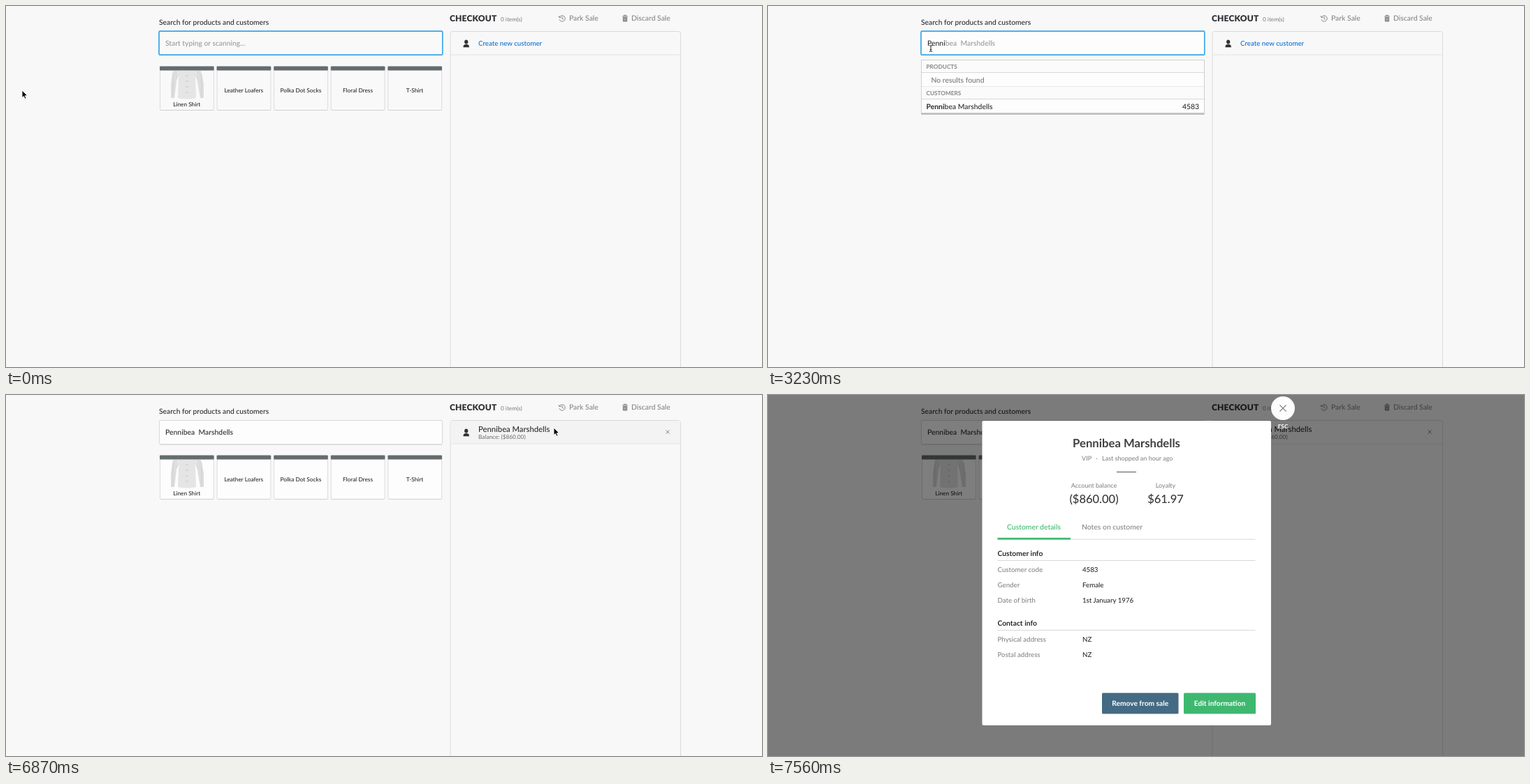
An HTML page for the animation above (9170 ms loop, 1082 px wide and 518 px high).

```html
<!DOCTYPE html>
<html lang="en">
<head>
<meta charset="utf-8">
<title>Checkout</title>
<style>
html, body { margin: 0; width: 100%; height: 100%; overflow: hidden; background: #f8f8f8; }
svg { display: block; font-family: Lato, "Open Sans", sans-serif; font-weight: 500; text-rendering: geometricPrecision; }
.b { font-weight: 700; }
</style>
</head>
<body>
<svg id="stage" width="1082" height="518" viewBox="0 0 1082 518"></svg>
<script>
const LOOP = 9170, INK = '#2b2b30', GREY = '#868686', GREEN = '#3eb870';
const NAME = 'Pennibea Marshdells';
const products = [['Blue Pen', '$3.00'], ['Polka Dot Socks', '$12.00']];
const customers = [['Petra Wadkins', 'Petra-K4D7'], [NAME, '4583']];
const cards = ['Linen Shirt', 'Leather Loafers', 'Polka Dot Socks', 'Floral Dress', 'T-Shirt'];

// [time, value]: each value holds until the next
const typing = [[0, ''], [1630, 'P'], [1960, 'Pe'], [2110, 'Pen'], [2380, 'Penn'], [2570, 'Penni'], [3580, NAME]];
const queries = [[0, ''], [1720, 'P'], [2110, 'Pe'], [2200, 'Pen'], [2480, 'Penn'], [2750, 'Penni'], [4360, '']];
const caretOn = [[0, false], [1330, true], [3230, false], [3580, true], [4060, false]];
const dimming = [[0, 0], [6960, .25], [7050, .5]];

// [time, x, y] of the pointer
const path = [
  [0, 23, 121], [60, 38, 119], [240, 38, 119], [420, 134, 98], [480, 167, 91], [600, 222, 58], [660, 233, 61],
  [4960, 233, 61], [5020, 234, 61], [5400, 440, 52], [5700, 600, 42], [5800, 640, 29], [5910, 671, 28],
  [6120, 727, 30], [6300, 780, 50], [6400, 784, 47], [7200, 784, 47], [7260, 728, 122], [7440, 728, 122], [7500, 522, 461]
];

const ctx = document.createElement('canvas').getContext('2d');
const inputText = s => s.replace(' ', '\u00a0\u00a0');
const widthOf = s => {
  ctx.font = '500 10.4px Lato, "Open Sans", sans-serif';
  ctx.textRendering = 'geometricPrecision';
  return ctx.measureText(inputText(s)).width;
};
const at = (keys, t) => keys.filter(k => k[0] <= t).pop()[1];

const text = (x, y, size, fill, s, more = '') =>
  `<text x="${x}" y="${y}" font-size="${size}" fill="${fill}" ${more}>${s}</text>`;
const rect = (x, y, w, h, fill, more = '') =>
  `<rect x="${x}" y="${y}" width="${w}" height="${h}" fill="${fill}" ${more}/>`;
const line = (d, stroke, w = 1, more = '') =>
  `<path d="${d}" fill="none" stroke="${stroke}" stroke-width="${w}" ${more}/>`;
const cross = (x, y, r, stroke, w) =>
  line(`M${x - r} ${y - r}l${2 * r} ${2 * r}m0 ${-2 * r}l${-2 * r} ${2 * r}`, stroke, w);
const BOLD = 'class="b"', MID = 'text-anchor="middle"', END = 'text-anchor="end"';

const shirt =
  `<path d="M239 93L236 112V132h5l3-24 2-15zM279 93l4 19v20h-5l-4-24-2-15z" fill="#dedede"/>
   <path d="M246 93h26l-1 8 1 31c-8 2-18 2-26 0l1-31z" fill="#e5e5e5"/>` +
  line('M239 97v34M280 97v34M247 97l-3 8M271 97l3 8', '#cfcfcf', 1) +
  line('M257 100h4M257 108h4M257 116h4M257 124h4', '#bdbdbd', .8);

function card(label, i, fill) {
  const x = 220.5 + 81.6 * i;
  return rect(x, 87, 76.8, 62.5, fill, 'rx="1.5" stroke="#dcdcdc"') +
    line(`M${x + 1} 149.5h75`, '#cfcfcf') +
    rect(x - .5, 86.5, 77.6, 6, '#646c6e', 'rx="1"') +
    (i ? '' : shirt) + text(x + 38.2, i ? 124 : 144, 8.25, INK, label, MID);
}

function checkout(t) {
  const picked = t >= 4360;
  const header = picked
    ? text(676, 53, 11.25, INK, NAME) + text(676, 63, 8.25, '#777', 'Balance: ($860.00)') + cross(947, 53, 2.6, '#888', 1)
    : text(676, 57.3, 9.7, '#0a6fd6', 'Create new customer');
  return text(635, 22, 12, '#303034', 'CHECKOUT', 'font-weight="900" letter-spacing=".2"') +
    text(708, 22, 8.25, GREY, '0 item(s)') +
    line('M792.2 16.2a4.2 4.2 0 1 1 -.2 3M791 14.2l1 2.5 2.5-.4M796 15.2v3l2 1', GREY) +
    text(806, 21.3, 10.4, GREY, 'Park Sale') +
    line('M882 15h8M884.5 14.5v-1.2h3v1.2', GREY, 1.1) + rect(882.8, 16, 6.4, 6.5, GREY, 'rx=".8"') +
    line('M885 17.5v3.5M887 17.5v3.5', '#ddd', .7) +
    text(895, 21.3, 10.4, GREY, 'Discard Sale') +
    rect(636, 36.5, 329.5, 490, 'none', 'rx="3" stroke="#dadada"') +
    (t >= 6870 && t < 6960 ? rect(636.5, 37, 328.5, 33, '#f3f3f3') : '') +
    line('M636 70h329', '#e4e4e4') +
    `<ellipse cx="658.7" cy="51.6" rx="2.6" ry="3" fill="#333"/>
     <path d="M654.5 59.2c0-3.6 1.5-4.2 4.2-4.2s4.2.6 4.2 4.2z" fill="#333"/>` + header;
}

function searchBox(t, fill) {
  const typed = at(typing, t), query = at(queries, t), w = widthOf(typed);
  const focused = t < 6690;
  const hint = query.length > 2 && t < 3580 ? NAME.slice(typed.length) : '';
  return text(219, 27, 10.3, INK, 'Search for products and customers') +
    (focused
      ? rect(219, 36.2, 405.8, 34, fill, 'rx="1.5" stroke="#3ba5e6" stroke-width="1.7"')
      : line('M220 71h404', '#d0d0d0') + rect(219.5, 36.5, 405, 34, fill, 'rx="1.5" stroke="#d8d8d8"')) +
    (t >= 4360 && focused ? rect(228, 47, w, 12.5, '#aed3fa') : '') +
    (typed
      ? text(228, 57.2, 10.4, INK, `${inputText(typed)}<tspan fill="#999">${inputText(hint)}</tspan>`)
      : text(228, 57.2, 10.3, '#999', 'Start typing or scanning...')) +
    (at(caretOn, t) && t < 4360 ? rect(228 + w, 47, 1, 12, '#222') : '');
}

function results(t) {
  const query = at(queries, t);
  if (!query) return '';
  const mark = s => s.replace(query, `<tspan class="b">${query}</tspan>`);
  let y = 77.5, body = '';
  const section = (title, rows, indent, active) => {
    body += rect(219.5, y, 405, 18, '#fbfbfb') + text(226.5, y + 12, 8.25, GREY, title, BOLD) +
      line(`M219.5 ${y + 18}h405`, '#d8d8d8');
    y += 18;
    const found = rows.filter(r => r[0].includes(query));
    for (const [name, code] of found) {
      if (active) body += rect(220, y + .5, 404, 19, '#eee');
      body += text(indent, y + 14, 10.4, INK, mark(name)) + text(617, y + 14, 10.4, INK, mark(code), END);
      y += 19;
    }
    if (!found.length) {
      body += text(233.5, y + 14, 10.4, '#777', 'No results found');
      y += 19;
    }
    y += 1;
    body += line(`M219.5 ${y}h405`, '#d8d8d8');
  };
  section('PRODUCTS', products, 240.5);
  section('CUSTOMERS', customers, 226.5, t >= 3580);
  const h = y - 77.5;
  return rect(219, 79, 406, h + .9, '#bdbdbd', 'rx="1.5"') + rect(219.5, 77.5, 405, h, '#fdfdfd') +
    body + rect(219.5, 77.5, 405, h, 'none', 'stroke="#d0d0d0"');
}

function modal(t) {
  const dim = at(dimming, t);
  if (!dim) return '';
  const fields = (title, y, rows) =>
    text(328.5, y, 10.3, INK, title, BOLD) + line(`M328.5 ${y + 6.2}h369`, '#d8d8d8') +
    rows.map(([label, value], i) =>
      text(328.5, y + 23 + 22 * i, 9.7, GREY, label) + text(450, y + 23 + 22 * i, 9.7, INK, value)).join('');
  const button = (x, w, fill, label) =>
    rect(x, 427.5, w, 30, fill, 'rx="1.5"') + text(x + w / 2, 446.2, 10.2, '#fff', label, BOLD + MID);
  return rect(0, 0, 1082, 518, '#000', `opacity="${dim}"`) +
    rect(306.5, 37, 413.5, 437, '#fff', 'rx="2"') +
    text(513, 75, 16.7, '#404044', NAME, BOLD + MID) +
    text(449, 94, 9, GREY, 'VIP') + text(469.5, 94, 9, GREY, '·') + text(478, 94, 9, GREY, 'Last shopped an hour ago') +
    line('M499 110.5h28', '#555') +
    text(466.5, 133.3, 9, GREY, 'Account balance', MID) + text(569, 133.3, 9, GREY, 'Loyalty', MID) +
    text(466.5, 155, 16.5, '#38383c', '($860.00)', MID) + text(569, 155, 16.5, '#38383c', '$61.97', MID) +
    text(342, 193.3, 10.4, GREEN, 'Customer details') + text(449, 193.3, 10.4, GREY, 'Notes on customer') +
    line('M328.5 207h369', '#d8d8d8') + rect(328.5, 204.8, 104.5, 2.7, GREEN) +
    fields('Customer info', 231.3, [['Customer code', '4583'], ['Gender', 'Female'], ['Date of birth', '1st January 1976']]) +
    fields('Contact info', 331.3, [['Physical address', 'NZ'], ['Postal address', 'NZ']]) +
    button(478, 109.5, '#446a84', 'Remove from sale') +
    button(595, 103, t < 7050 ? '#49b978' : GREEN, 'Edit information') +
    '<circle cx="737" cy="19" r="17" fill="#fdfdfd"/>' + cross(737, 19, 4.6, '#777', 1.2) +
    text(737, 48.2, 8.25, '#fff', 'ESC', BOLD + MID);
}

function pointer(t) {
  if (t >= 7560) return '';
  const s = Math.floor(t / 60) * 60;
  const i = Math.max(0, path.findIndex(k => k[0] > s) - 1);
  const last = path[path.length - 1];
  const [t0, x0, y0] = s >= last[0] ? last : path[i];
  const [t1, x1, y1] = s >= last[0] ? last : path[i + 1];
  const p = t1 > t0 ? (s - t0) / (t1 - t0) : 0;
  const x = x0 + (x1 - x0) * p, y = y0 + (y1 - y0) * p;
  const overInput = t < 6960 && x > 219 && x < 625 && y > 36 && y < 71;
  const shape = overInput
    ? line('M-2.2-4.5q2 0 2.2 1.3q.2-1.3 2.2-1.3M0-3.5v7M-2.2 4.5q2 0 2.2-1.3q.2 1.3 2.2 1.3M-1.2 1.5h2.4', '#222')
    : '<path d="M0 0v10.6l2.4-2.2 1.7 3.8 1.9-.8-1.7-3.7h3.4z" fill="#000" stroke="#fff" stroke-width=".9"/>';
  return `<g transform="translate(${x.toFixed(1)} ${y.toFixed(1)})">${shape}</g>`;
}

const stage = document.getElementById('stage');
let shown = '';

function frame() {
  const t = performance.now() % LOOP;
  const fill = t < 1630 ? '#f9f9f9' : '#fdfdfd';
  const scene = rect(0, 0, 1082, 518, '#f8f8f8') + checkout(t) + searchBox(t, fill) +
    cards.map((label, i) => card(label, i, fill)).join('') + results(t) + modal(t) + pointer(t);
  if (scene !== shown) stage.innerHTML = shown = scene;
  requestAnimationFrame(frame);
}
frame();
</script>
</body>
</html>
```
